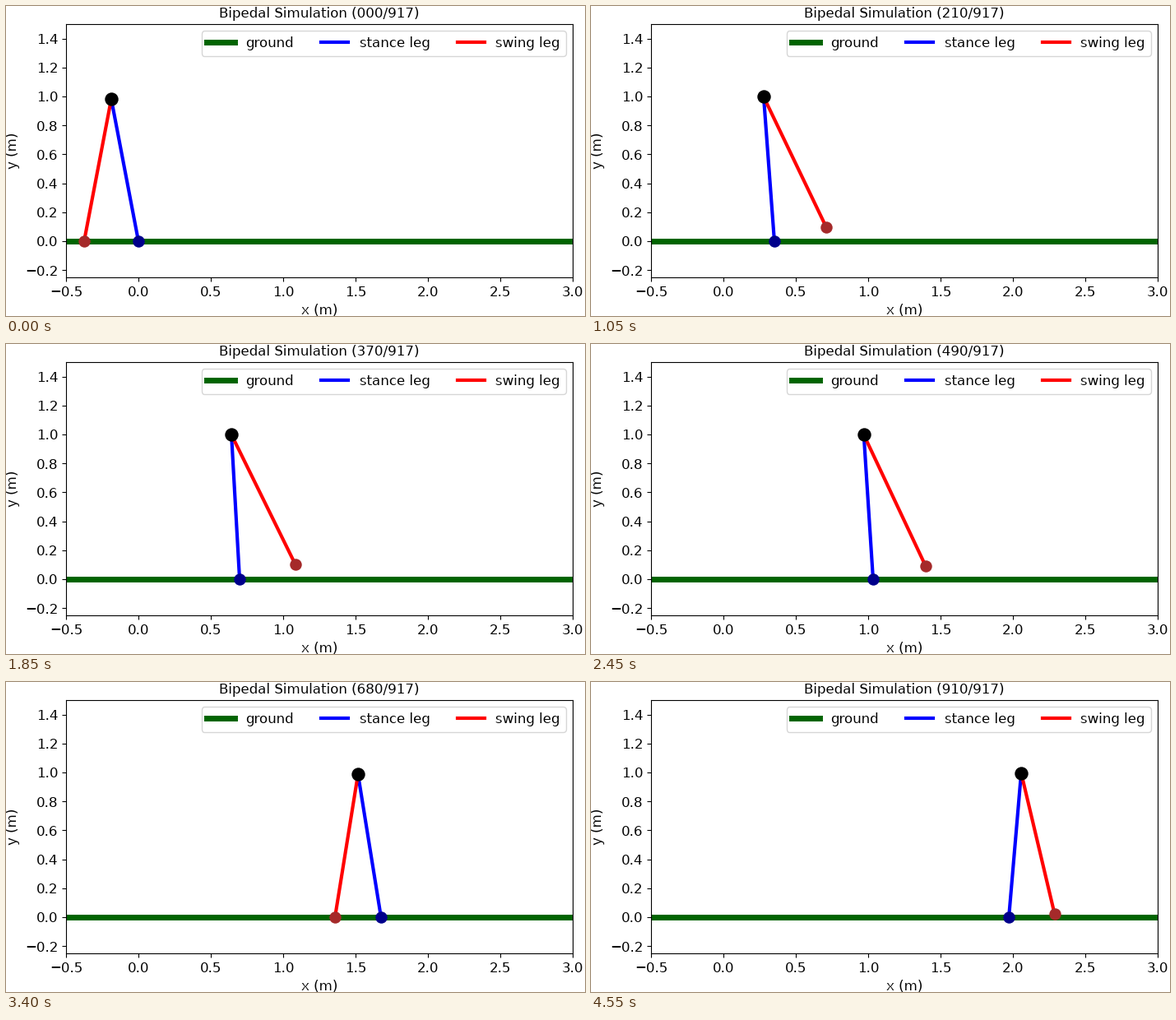
Animation of 704 by 377 pixels, one loop 4.6 s. Source, as a matplotlib script:

```python
import numpy as np
import matplotlib.pyplot as plt
from matplotlib.animation import FuncAnimation

W, H, DPI = 704, 377, 100
FRAMES, INTERVAL, STRIDE, SAMPLES = 92, 50, 10, 917

# Footholds (m) and the ticks at which each step starts.
FEET = [-0.375, 0.0, 0.352, 0.699, 1.034, 1.358, 1.676, 1.972, 2.260]
STRIKES = [0, 13.5, 29.5, 42, 55, 68, 81, 92.5]

# One gait cycle: phase, stance lean and swing angle, in units of the
# half angle between the legs at touchdown.
PHASE, LEAN, SWING = np.array([
    (0, -1, -1), (0.16, -0.66, 0.4), (0.31, -0.56, 1.77), (0.47, -0.42, 2.55),
    (0.6, -0.33, 2.68), (0.77, 0.19, 2.45), (0.87, 0.59, 1.6), (1, 1, 1),
]).T


def half_angle(i):
    """Half the angle between the legs when feet i and i + 1 are both down."""
    return np.arcsin((FEET[i + 1] - FEET[i]) / 2)


def hermite(t, ts, ys):
    """Smooth curve through the points (ts, ys), evaluated at t."""
    slopes = np.gradient(ys, ts, edge_order=2)
    i = np.clip(np.searchsorted(ts, t, side="right") - 1, 0, len(ts) - 2)
    h = ts[i + 1] - ts[i]
    u = (t - ts[i]) / h
    return ((1 + 2 * u) * (1 - u) ** 2 * ys[i] + u * (1 - u) ** 2 * h * slopes[i]
            + u * u * (3 - 2 * u) * ys[i + 1] + u * u * (u - 1) * h * slopes[i + 1])


def walker(t):
    """Stance foot, hip and swing foot positions at tick t."""
    step = np.searchsorted(STRIKES, t, side="right") - 1
    start, end = STRIKES[step:step + 2]
    u = (t - start) / (end - start)
    scale = (1 - u) * half_angle(step) + u * half_angle(step + 1)
    lean, swing = (scale * hermite(u, PHASE, curve) for curve in (LEAN, SWING))
    foot = np.array([FEET[step + 1], 0.0])
    hip = foot + [np.sin(lean), np.cos(lean)]
    return foot, hip, hip + [np.sin(swing), -np.cos(swing)]


plt.rcParams.update({"font.family": "DejaVu Sans", "font.size": 12,
                     "axes.titlesize": 12, "axes.labelsize": 12,
                     "text.hinting": "native"})
fig = plt.figure(figsize=(W / DPI, H / DPI), dpi=DPI, facecolor="white")
ax = fig.add_axes([73 / W, 47 / H, 616 / W, 308 / H])
ax.set_xlim(-0.5, 3.0)
ax.set_ylim(-0.25, 1.5)
ax.set_xticks(np.arange(-1, 7) / 2)
ax.set_yticks(np.arange(-1, 8) / 5)
ax.set_xlabel("x (m)")
ax.set_ylabel("y (m)")
title = ax.set_title("")

ax.plot([-0.5, 3.0], [0, 0], color="darkgreen", lw=5, label="ground")
stance_leg, = ax.plot([], [], color="blue", lw=3, label="stance leg")
swing_leg, = ax.plot([], [], color="red", lw=3, label="swing leg")


def joint(color, size):
    return ax.plot([], [], "o", color=color, ms=size, mew=0)[0]


stance_foot = joint("darkblue", 10.4)
swing_foot = joint("brown", 10.4)
hip_joint = joint("black", 11.8)
ax.legend(loc="upper right", ncol=3, fontsize=12)


def draw(n):
    foot, hip, free = walker(n)
    stance_leg.set_data(*zip(foot, hip))
    swing_leg.set_data(*zip(hip, free))
    for dot, (x, y) in ((stance_foot, foot), (swing_foot, free), (hip_joint, hip)):
        dot.set_data([x], [y])
    title.set_text(f"Bipedal Simulation ({n * STRIDE:03d}/{SAMPLES})")
    return stance_leg, swing_leg, stance_foot, swing_foot, hip_joint, title


anim = FuncAnimation(fig, draw, frames=FRAMES, interval=INTERVAL,
                     init_func=lambda: draw(0), repeat=True, blit=False)
plt.show()
```
